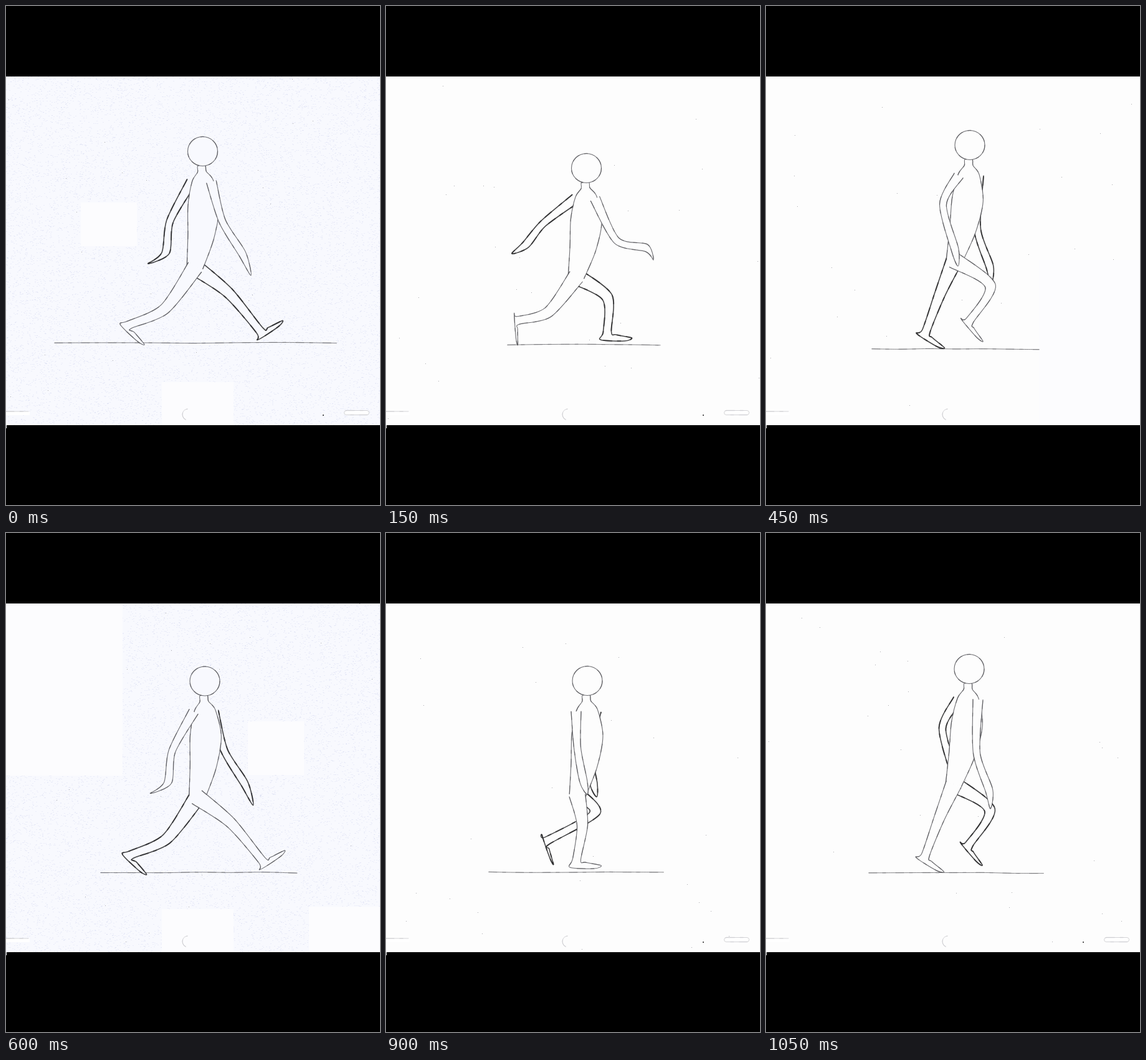
Write an HTML page with a canvas that moves like this. It is 600 px wide and 800 px high and loops after 1.2 s.

```html
<!DOCTYPE html>
<html lang="en">
<head>
<meta charset="utf-8">
<title>Pencil walk cycle</title>
<style>
  html, body { margin: 0; width: 100%; height: 100%; overflow: hidden; background: #000; }
  canvas { display: block; }
</style>
</head>
<body>
<canvas id="stage" width="600" height="800"></canvas>
<script>
const ctx = document.getElementById('stage').getContext('2d');
const HOLD = 150;
const PAPER = { top: 113, height: 559 };
const INK = {
  far: { color: '#19191b', width: 1.6 },
  near: { color: '#4c4c50', width: 1.1 },
  ground: { color: '#66666a', width: 1 },
  faint: { color: '#cacace', width: 1 }
};
const ARM_WIDTHS = [8, 5.5, 6];
const LEG_WIDTHS = [13, 8.5, 6.5];
const TORSO = { at: [0, 0.06, 0.15, 0.4, 0.7, 1], widths: [6, 7, 17, 25, 21, 13], bulge: 8 };
// Distance along the foot and depth towards the sole, seen from the ankle.
const FOOT = [[-11, 13], [28, 15], [39, 10], [14, 5]];

// One step of the walk. Legs are knee, ankle, foot angle; arms are elbow, wrist, fingertip.
// The second step swaps the sides and moves the figure by shift.
const STEP = [
  { // contact
    head: [315.5, 233], hip: [303, 419], shift: [3.5, 4.5], floor: 540, spans: [[78, 530], [152, 467]],
    swing: { leg: [[254, 486], [198, 511], 42], arm: [[347, 345], [379, 397], [393, 432]] },
    stance: { leg: [[357, 460], [407, 520], -35], arm: [[263, 345], [256, 396], [228, 413]] }
  },
  { // down
    head: [321.5, 260], hip: [305, 434], shift: [-2, -3], floor: 543, spans: [[195, 440], [165, 455]],
    swing: { leg: [[260, 491], [212, 504], 85], arm: [[370, 376], [418, 388], [429, 407]] },
    stance: { leg: [[355, 467], [355, 522], 0], arm: [[252, 349], [224, 383], [202, 397]] }
  },
  { // passing
    head: [324, 238], hip: [308, 422], shift: [-1, -1], floor: 545, spans: [[175, 440], [165, 445]],
    swing: { leg: [[336, 450], [260, 494], 70], arm: [[326, 350], [334, 403], [339, 424]] },
    stance: { leg: [[316, 470], [307, 524], 0], arm: [[308, 345], [318, 400], [324, 420]] }
  },
  { // up
    head: [327, 223], hip: [302, 408], shift: [-1, -5], floor: 550, spans: [[170, 438], [165, 445]],
    swing: { leg: [[360, 449], [327, 504], 48], arm: [[284, 318], [303, 390], [308, 417]] },
    stance: { leg: [[279, 462], [257, 521], 30], arm: [[339, 358], [359, 418], [361, 447]] }
  }
];
// Blank areas on some of the scanned sheets.
const PATCHES = {
  0: [[120, 315, 90, 70], [250, 603, 115, 69]],
  3: [[438, 408, 162, 264]],
  4: [[0, 113, 187, 276], [388, 302, 90, 86], [250, 603, 115, 69], [486, 599, 114, 73]]
};

const add = (a, b) => [a[0] + b[0], a[1] + b[1]];
const unit = (a, b) => {
  const length = Math.hypot(b[0] - a[0], b[1] - a[1]) || 1;
  return [(b[0] - a[0]) / length, (b[1] - a[1]) / length];
};

function seeded(seed) {
  return () => {
    seed = (seed * 1664525 + 1013904223) >>> 0;
    return seed / 4294967296;
  };
}

// Smooth curve passing through every point.
function trace(points) {
  const at = i => points[Math.max(0, Math.min(points.length - 1, i))];
  ctx.beginPath();
  ctx.moveTo(...points[0]);
  for (let i = 0; i < points.length - 1; i++) {
    const [a, b, c, d] = [at(i - 1), at(i), at(i + 1), at(i + 2)];
    ctx.bezierCurveTo(b[0] + (c[0] - a[0]) / 7, b[1] + (c[1] - a[1]) / 7,
      c[0] - (d[0] - b[0]) / 7, c[1] - (d[1] - b[1]) / 7, ...c);
  }
}

// Strokes the current path; a second broken pass gives uneven pressure.
function pencil({ color, width }) {
  ctx.strokeStyle = color;
  ctx.lineWidth = width;
  ctx.globalAlpha = 0.8;
  ctx.stroke();
  ctx.setLineDash([13, 9, 5, 16]);
  ctx.lineWidth = width * 1.3;
  ctx.globalAlpha = 0.5;
  ctx.stroke();
  ctx.setLineDash([]);
  ctx.globalAlpha = 1;
}

function outline(ink, points, paper) {
  trace(points);
  ctx.fillStyle = paper;
  ctx.fill();
  pencil(ink);
}

// Back and front contours at the given half widths around a chain of joints.
function contours(joints, widths) {
  const back = [], front = [];
  joints.forEach((joint, i) => {
    const into = unit(joints[Math.max(0, i - 1)], joint);
    const out = unit(joint, joints[Math.min(joints.length - 1, i + 1)]);
    const [dx, dy] = unit([0, 0], add(into, out));
    back.push(add(joint, [-dy * widths[i], dx * widths[i]]));
    front.push(add(joint, [dy * widths[i], -dx * widths[i]]));
  });
  return { back, front };
}

function limb(joints, widths, end) {
  const { back, front } = contours(joints, widths);
  return [...back, ...end, ...front.reverse()];
}

function legOutline(hip, [knee, ankle, degrees]) {
  const angle = degrees * Math.PI / 180, c = Math.cos(angle), s = Math.sin(angle);
  const flatness = Math.max(0.4, c);
  const foot = FOOT.map(([along, depth]) =>
    add(ankle, [along * c - depth * flatness * s, along * s + depth * flatness * c]));
  return limb([hip, knee, ankle], LEG_WIDTHS, foot);
}

function armOutline(neck, [elbow, wrist, tip]) {
  const shoulder = add(neck, [16 * Math.sign(elbow[0] - neck[0]), 26]);
  return limb([shoulder, elbow, wrist], ARM_WIDTHS, [tip]);
}

function torsoOutline(neck, hip) {
  const spine = TORSO.at.map(t => [
    neck[0] + (hip[0] - neck[0]) * t + TORSO.bulge * Math.sin(Math.PI * t),
    neck[1] + (hip[1] - neck[1]) * t
  ]);
  const { back, front } = contours(spine, TORSO.widths);
  return [...back.reverse(), ...front];
}

function drawFigure({ head, hip, swing, stance }, secondStep, paper) {
  const [near, far] = secondStep ? [stance, swing] : [swing, stance];
  const neck = add(head, [-2, 23]);
  outline(INK.far, armOutline(neck, far.arm), paper);
  outline(INK.far, legOutline(hip, far.leg), paper);
  outline(INK.near, torsoOutline(neck, hip), paper);
  outline(INK.near, legOutline(hip, near.leg), paper);
  outline(INK.near, armOutline(neck, near.arm), paper);
  ctx.beginPath();
  ctx.ellipse(...head, 24, 23.5, 0, 0, Math.PI * 2);
  ctx.fill();
  pencil(INK.near);
}

function drawSheet(index, paper, grain, random) {
  const scatter = (count, width, color) => {
    ctx.fillStyle = color;
    for (let i = 0; i < count; i++) {
      ctx.fillRect(Math.floor(random() * 600), PAPER.top + Math.floor(random() * PAPER.height), width, 1);
    }
  };
  ctx.fillStyle = paper;
  ctx.fillRect(0, PAPER.top, 600, PAPER.height);
  ctx.fillRect(0, PAPER.top + PAPER.height, 1, 5);
  if (grain) scatter(14000, 2, 'rgba(205,210,235,.3)');
  scatter(26, 1, '#aaaaae');

  // Peg slots, blank areas, then the round peg hole.
  ctx.fillStyle = '#fff';
  ctx.fillRect(0, 650, 38, 6);
  ctx.beginPath();
  ctx.roundRect(542.5, 648.5, 40, 7, 4);
  ctx.fill();
  pencil(INK.faint);
  trace([[0, 650], [36, 650]]);
  pencil(INK.faint);
  ctx.fillStyle = '#555';
  ctx.fillRect(508, 655, 2, 2);
  ctx.fillStyle = '#fcfcfe';
  for (const patch of PATCHES[index] || []) ctx.fillRect(...patch);
  ctx.beginPath();
  ctx.arc(292, 655, 9, 2, 4.6);
  pencil(INK.faint);
}

function drawGround([from, to], floor, random) {
  const points = [];
  for (let i = 0; i <= 6; i++) points.push([from + (to - from) * i / 6, floor + random() * 1.6 - 0.8]);
  trace(points);
  pencil(INK.ground);
}

function drawFrame(index) {
  const pose = STEP[index % STEP.length];
  const secondStep = index >= STEP.length;
  const grain = index % STEP.length === 0;
  const paper = grain ? '#f8f9fe' : '#fdfdfd';
  const random = seeded(index * 977 + 31);
  ctx.fillStyle = '#000';
  ctx.fillRect(0, 0, 600, 800);
  drawSheet(index, paper, grain, random);
  const [dx, dy] = secondStep ? pose.shift : [0, 0];
  drawGround(pose.spans[Number(secondStep)], pose.floor + dy, random);
  ctx.save();
  ctx.translate(dx, dy);
  drawFigure(pose, secondStep, paper);
  ctx.restore();
}

ctx.lineCap = ctx.lineJoin = 'round';
let shown = -1;
function tick() {
  const index = Math.floor(performance.now() / HOLD) % (STEP.length * 2);
  if (index !== shown) drawFrame(shown = index);
  requestAnimationFrame(tick);
}
tick();
</script>
</body>
</html>
```
